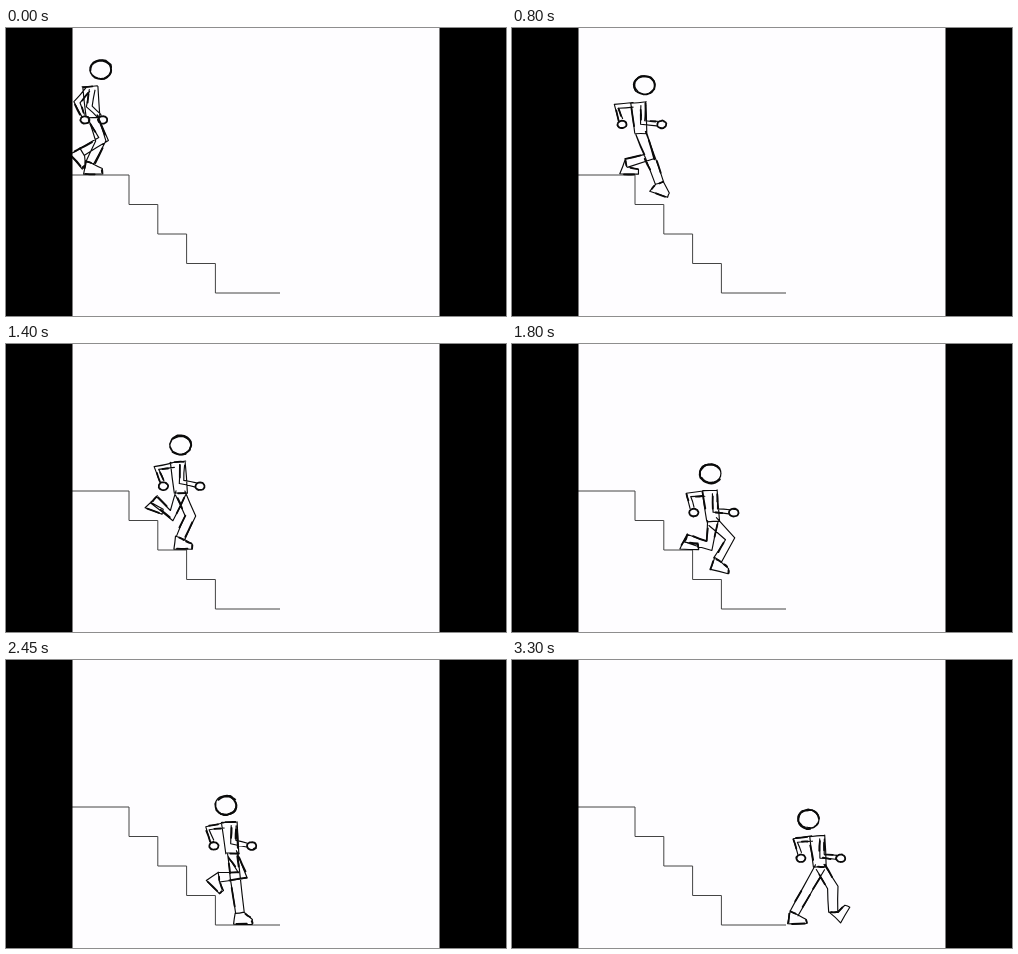
Write an HTML page that moves like this. It is 500x288 px and loops after 3.35 s.

```html
<!DOCTYPE html>
<html lang="en">
<head>
<meta charset="utf-8">
<title>Walking down the stairs</title>
<style>
  html, body { margin: 0; width: 100%; height: 100%; overflow: hidden; background: #000; }
  svg { display: block; width: 100%; height: 100%; }
  path { fill: none; stroke: #0a0a0a; stroke-linecap: round; stroke-linejoin: round; }
  #stairs { stroke: #444; stroke-width: 1; stroke-linecap: butt; stroke-linejoin: miter; }
  #ink { stroke-width: 1.15; }
  #accent { stroke-width: 1.8; }
</style>
</head>
<body>
<svg viewBox="0 0 500 288">
  <rect x="66" width="368" height="288" fill="#fefdff"/>
  <path id="stairs"/>
  <path id="ink"/>
  <path id="accent"/>
  <rect width="66.500" height="288"/>
  <rect x="433.500" width="66.500" height="288"/>
</svg>
<script>
const LOOP = 3350;
const STEP = 510, FIRST_STEP = 310;
const RISE = 29.5, TREAD = 28.8;
const $ = id => document.getElementById(id);
const clamp = (v, lo, hi) => Math.min(hi, Math.max(lo, v));
const mix = (a, b, u) => [a[0] + (b[0] - a[0]) * u, a[1] + (b[1] - a[1]) * u];
const add = (p, x, y) => [p[0] + x, p[1] + y];

let stairs = 'M66 147';
for (let i = 0; i < 4; i++) stairs += `H${123 + TREAD * i}v${RISE}`;
$('stairs').setAttribute('d', stairs + 'H274');

// Hip path: time, x, y.
const hips = [
  [0, 87, 89.5], [500, 110, 89.5], [1050, 152, 124], [1800, 201, 177.5],
  [2200, 210, 187], [2800, 258, 206], [3300, 308, 207]
];

// Drawings change on 50 ms beats, in runs of [first, last, count].
const beats = [0];
for (const [first, last, n] of [
  [50, 500, 6], [600, 1050, 8], [1150, 1650, 8],
  [1750, 2200, 7], [2300, 2800, 8], [2900, 3300, 6]
]) {
  for (let i = 0; i < n; i++) {
    beats.push(Math.floor((first + (last - first) * i / (n - 1)) / 50) * 50);
  }
}

function hipAt(t) {
  const i = Math.max(1, hips.findIndex(h => h[0] >= t));
  const [t0, ...a] = hips[i - 1], [t1, ...b] = hips[i];
  return mix(a, b, (t - t0) / (t1 - t0));
}

// Where the k-th footfall rests; strides lengthen on the floor.
const plant = k => [
  87 + 30 * k + 18 * Math.max(0, k - 5),
  146 + RISE * clamp(k - 1, 0, 4)
];

// Standing and swinging foot: sole centre and pitch.
function feetAt(t) {
  const cycle = (t - FIRST_STEP) / STEP + 1;
  const k = Math.floor(cycle), u = cycle - k;
  const ease = u ** 3 / (u ** 3 + (1 - u) ** 3);
  const lift = 26 * Math.sqrt(u * (1 - u));
  const down = plant(k + 1)[1] > plant(k)[1];
  return [
    { sole: plant(k), pitch: 0 },
    {
      sole: add(mix(plant(k - 1), plant(k + 1), ease), 0, -lift),
      pitch: down ? .8 * Math.sin(Math.PI * u) : 1.4 * Math.sin(2 * Math.PI * u)
    }
  ];
}

// Middle joint of a two-bone limb; side 1 bends forward, -1 backward.
function bend(a, b, l1, l2, side) {
  const dx = b[0] - a[0], dy = b[1] - a[1], d = Math.hypot(dx, dy);
  const along = Math.min(d, l1 + l2) / 2 + (l1 * l1 - l2 * l2) / (2 * d);
  const out = side * Math.sqrt(Math.max(0, l1 * l1 - along * along));
  return add(a, (dx * along + dy * out) / d, (dy * along - dx * out) / d);
}

let seed, ink, accent;
function rand() {
  seed = (seed * 16807) % 2147483647;
  return seed / 2147483647;
}
const wobble = amount => (rand() - .5) * 2 * amount;

function handLine(points, shake) {
  const p = points.map(([x, y]) => add([x, y], wobble(shake), wobble(shake)));
  let d = 'M' + p[0].map(v => v.toFixed(1));
  for (let i = 1; i < p.length; i++) {
    const c = add(mix(p[i - 1], p[i], .5), wobble(shake), wobble(shake));
    d += 'Q' + [...c, ...p[i]].map(v => v.toFixed(1));
  }
  return d;
}

// One pass over the line, then short heavier strokes over parts of it.
function sketch(points) {
  ink += handLine(points, .6);
  for (let i = 1; i < points.length; i++) {
    if (rand() < .35) continue;
    const from = rand() * .4, to = from + .4 + rand() * .3;
    accent += handLine([mix(points[i - 1], points[i], from), mix(points[i - 1], points[i], to)], .5);
  }
}

function oval([x, y], rx, ry, turns) {
  const points = [], start = rand() * 6;
  for (let a = 0; a < turns * 6.3; a += .3) {
    const r = 1 + .06 * Math.sin(a * .7 + start) + wobble(.03);
    points.push([x + Math.cos(start + a) * rx * r, y + Math.sin(start + a) * ry * r]);
  }
  return handLine(points, .15);
}

// Two outlines around a bent limb, tapering by half-widths.
function limb(joints, halves) {
  const sides = [[], []];
  joints.forEach((p, i) => {
    const a = joints[Math.max(i - 1, 0)], b = joints[Math.min(i + 1, joints.length - 1)];
    const dx = b[0] - a[0], dy = b[1] - a[1], len = Math.hypot(dx, dy) || 1;
    const nx = -dy / len * halves[i], ny = dx / len * halves[i];
    sides[0].push(add(p, nx, ny));
    sides[1].push(add(p, -nx, -ny));
  });
  sides.forEach(sketch);
  return sides.map(side => side[side.length - 1]);
}

function leg(hip, { sole, pitch }) {
  const cos = Math.cos(pitch), sin = Math.sin(pitch);
  const onFoot = (x, y) => add(sole, x * cos - y * sin, x * sin + y * cos);
  const ankle = onFoot(-3, -11);
  const knee = bend(hip, ankle, 24.5, 24.5, 1);
  const [back, front] = limb([hip, knee, ankle], [5, 5, 4.5]);
  sketch([back, onFoot(-9, 0), onFoot(9.5, 0), onFoot(9, -5), front, back]);
}

function arm(chest, swing) {
  const root = add(chest, 5 * swing, 3);
  const hand = add(chest, 4 + 20 * swing, 36 - 14 * swing * swing);
  const elbow = bend(root, hand, 17, 19, -1);
  limb([root, elbow, mix(elbow, hand, .75)], [2.5, 2.8, 2]);
  accent += oval(hand, 4.6, 3.8, 1.1);
}

function draw(frame) {
  const t = beats[frame];
  seed = 977 + frame * 7919;
  ink = accent = '';

  const hip = hipAt(t), chest = add(hip, -3, -31);
  const head = add(hip, 8 - 19 * t / 3300, -48);
  ink += oval(head, 10.6, 9.4, 2);
  accent += oval(head, 10.6, 9.4, .8);

  const [sb, sf] = [add(chest, -7.5, .5), add(chest, 7.5, -.5)];
  const [wb, wf] = [add(hip, -6.3, 0), add(hip, 6.3, 0)];
  [[sb, sf], [sb, wb], [sf, wf], [wb, wf]].forEach(sketch);

  feetAt(t).forEach(foot => leg(hip, foot));

  const swing = Math.cbrt(Math.cos(Math.PI * ((t - FIRST_STEP) / STEP + .08)));
  arm(chest, swing);
  arm(chest, -swing);

  $('ink').setAttribute('d', ink);
  $('accent').setAttribute('d', accent);
}

let shown = -1;
function tick() {
  const t = performance.now() % LOOP;
  const frame = beats.filter(b => b <= t).length - 1;
  if (frame !== shown) draw(shown = frame);
  requestAnimationFrame(tick);
}
tick();
</script>
</body>
</html>
```
